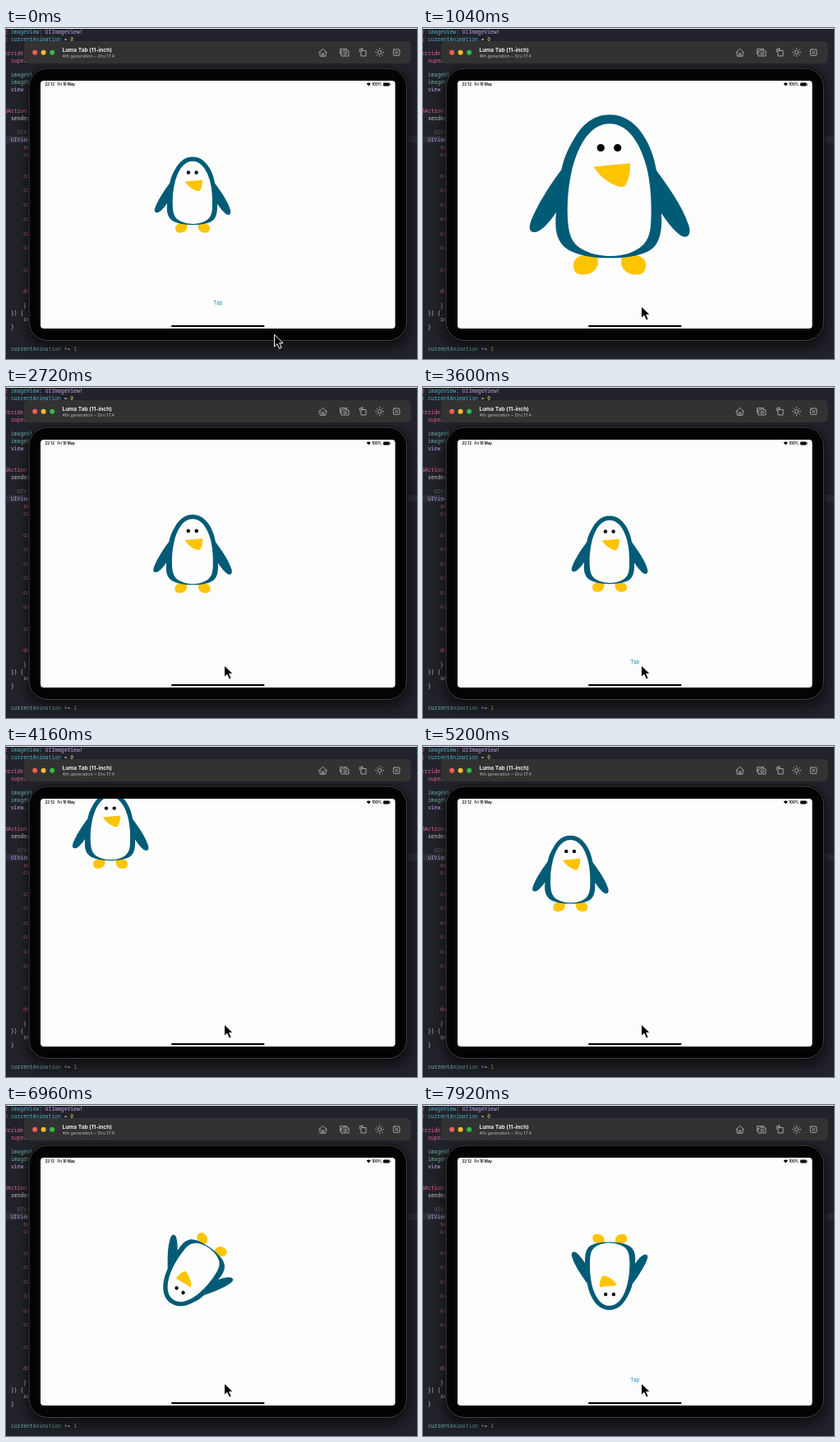
Recreate the animation shown at these times as an HTML page. Size 500 by 402 pixels, loop 8000 ms.

```html
<!DOCTYPE html>
<html lang="en">
<head>
<meta charset="utf-8">
<title>Spring animations</title>
<style>
html, body { margin: 0; width: 100%; height: 100%; overflow: hidden; background: #22232a; }
svg { display: block; width: 500px; height: 402px; }
text { white-space: pre; }
.code { font: 500 6.35px "Noto Sans Mono", "DejaVu Sans Mono", monospace; fill: #cfd0d4; }
.k { fill: #e0609a; }
.d { fill: #4fb0c8; }
.v { fill: #67b0a1; }
.t { fill: #c6a4f0; }
.n { fill: #d0bf69; }
.c { fill: #666b75; }
.ui { font-family: Inter, Roboto, sans-serif; }
.icon { fill: none; stroke: #bdbdbd; stroke-width: .8; stroke-linejoin: round; stroke-linecap: round; }
</style>
</head>
<body>
<svg viewBox="0 0 500 402">
  <defs>
    <clipPath id="screen"><rect x="42" y="64" width="431.5" height="301" rx="4"/></clipPath>
    <filter id="soft" x="-10%" y="-10%" width="120%" height="120%"><feGaussianBlur stdDeviation="7"/></filter>
  </defs>
  <rect width="500" height="402" fill="#22232a"/>
  <rect y="131" width="500" height="8.6" fill="#2d2e36"/>
  <g id="code" class="code"></g>
  <rect width="500" height="1" fill="#f0f0f0"/>

  <rect x="24" y="52" width="468" height="338" rx="26" fill="#000" opacity=".5" filter="url(#soft)"/>

  <!-- title bar -->
  <rect x="22" y="16" width="470.5" height="27" rx="5" fill="#323233"/>
  <circle cx="35.1" cy="29.8" r="3" fill="#fb5b54"/>
  <circle cx="45.6" cy="29.8" r="3" fill="#f8ba32"/>
  <circle cx="56.2" cy="29.8" r="3" fill="#31bd44"/>
  <g class="ui">
    <text x="68.5" y="28.8" font-size="6.6" font-weight="700" fill="#ececec">Luma Tab (11-inch)</text>
    <text x="68.5" y="36.2" font-size="5.4" fill="#b4b4b4">4th generation – Oru 17.4</text>
  </g>
  <g class="icon">
    <path d="M380.5 30L385.5 25.3L390.5 30M382 29V34.2H389V29M384.5 34V30.8H386.5V34"/>
    <path d="M406.5 31.5V25.6H414.6V26.8M408.3 28H410.2L411 27H413.4L414.2 28H417V34H408.3Z"/>
    <circle cx="412.5" cy="30.9" r="1.6"/>
    <path d="M432.3 27.5H438V34H432.3ZM430.3 29V25.7H434M432.8 24.4L434.2 25.7L432.8 27"/>
    <circle cx="454.5" cy="29.7" r="2.2"/>
    <path d="M454.5 24.6V25.7M454.5 33.7V34.8M449.4 29.7H450.5M458.5 29.7H459.6M450.9 26.1L451.7 26.9M457.3 32.5L458.1 33.3M450.9 33.3L451.7 32.5M457.3 26.9L458.1 26.1"/>
    <rect x="471.3" y="26" width="7.6" height="7.4" rx="1"/>
    <path d="M473.4 28L476.8 31.4M476.8 28L473.4 31.4"/>
  </g>

  <!-- tablet -->
  <rect x="26.5" y="47.5" width="462.5" height="333.5" rx="24" fill="#0b0b0c"/>
  <rect x="28" y="49" width="459.5" height="330.5" rx="22.5" fill="#030303" stroke="#454648"/>
  <g clip-path="url(#screen)">
    <rect x="42" y="64" width="432" height="302" fill="#fdfdfd"/>
    <g id="bird">
      <g transform="scale(.475) translate(-227 -202.75)">
        <g fill="#ffc400">
          <path id="foot" d="M191 277C181 280 180 295 189 298.7C200 302 213 296 213 284L212 274Z"/>
          <use href="#foot" transform="matrix(-1 0 0 1 454 0)"/>
        </g>
        <path fill="#005b77" d="M227 105.3C207 105.3 193 118 183 136C175 149 171 160 168.5 172
          C158 186 143 208 134 228C128 241 128 248 136 248C143 248 153 237 162 224
          C160 244 162 256 172 266C184 276 205 279.3 227 279.3C250 279.3 271 276 281 266
          C289 257 291 244 290 225C296 234 305 246 313.5 252C322.5 257 327 250 323 239
          C315 215 297 191 284 173C281.5 160 278.5 149 271.5 136C261.5 118 247 105.3 227 105.3Z"/>
        <path fill="#fdfdfd" d="M227 116.3C204 116.3 189.5 141 182 169C177 189 175 210 176 231
          C177 247 179 257 188 265C197 272 211 277 228 277C245 277 258 272 266 265
          C275 257 277 247 277.5 231C278 210 277 189 272 169C264.5 141 250 116.3 227 116.3Z"/>
        <circle cx="216.3" cy="145.5" r="4.6"/>
        <circle cx="236.7" cy="145.5" r="4.6"/>
        <path fill="#ffc400" d="M207.5 168.5L252 164.3C252.5 174 250.5 184 246.5 190.5C244.5 193.5 240 193.5 235 191.5C224 187 215 180 207.5 168.5Z"/>
      </g>
    </g>
    <g class="ui" font-weight="600" font-size="4.4">
      <text x="47.5" y="70.2">22:12</text>
      <text x="62.5" y="70.2">Fri 10 May</text>
      <text x="445.2" y="70.2">100%</text>
    </g>
    <path d="M438.6 67.6Q441.2 65.5 443.8 67.6L441.2 70.5Z"/>
    <rect x="459" y="66.6" width="7.6" height="3.8" rx="1"/>
    <rect x="467" y="67.8" width=".7" height="1.4"/>
    <text id="tap" class="ui" x="257.8" y="336.3" font-size="6.3" text-anchor="middle" fill="#2089b8">Tap</text>
    <rect x="201" y="361" width="113.5" height="2" rx="1"/>
  </g>

  <path id="cursor" d="M0 0V14.6L3.5 11.3L6 17L8.7 15.8L6.2 10.3H10.6Z" fill="#000" stroke="#fff" stroke-width="1"/>
</svg>
<script>
const $ = id => document.getElementById(id);

// baseline, x, then class:text runs separated by "|"
const lines = [
  [7, -9.3, "k:var |d:imageView|:: |t:UIImageView!"],
  [15.6, -9.3, "k:var |d:currentAnimation| := |n:0"],
  [33, -9.3, "k:override"],
  [41.8, 6, "k:super"],
  [59.2, 6, "v:imageView"],
  [68, 6, "v:imageView"],
  [76.8, 6, "t:view."],
  [103, -9.3, "k:@IBAction"],
  [111.8, 6, ":sender"],
  [129.2, 13.5, "c:UIView"],
  [138, 6, "t:UIView"],
  [146.8, 21, "k:switch"],
  ...[155.5, 181.7, 199.2, 216.7, 234.2, 251.7, 269.2, 295.5].map(y => [y, 21, "k:case"]),
  [321.8, 21, "k:default"],
  [338.8, 21, ":}"],
  [347.5, 6, ":}) {"],
  [356.3, 21, ":sender"],
  [365, 6, ":}"],
  [391.5, 6, "v:currentAnimation| :+= |n:1"]
];
$("code").innerHTML = lines.map(([y, x, runs]) => {
  const spans = runs.split("|").map(run => {
    const cut = run.indexOf(":");
    const lead = run.startsWith(" ") ? " " : "";
    return `<tspan class="${run.slice(0, cut).trim()}">${lead}${run.slice(cut + 1)}</tspan>`;
  });
  return `<text x="${x}" y="${y}">${spans.join("")}</text>`;
}).join("");

const LOOP = 8000, STEP = 80;
const taps = { grow: 565, shrink: 1995, move: 3660, back: 5115, turn: 6600 };

// underdamped spring from 0 to 1, with a starting push
function spring(ms) {
  if (ms <= 0) return 0;
  const s = ms / 1000, w = 7.62 * s;
  return 1 - Math.exp(-4.4 * s) * (Math.cos(w) - .079 * Math.sin(w));
}

function draw(t) {
  const at = name => spring(t - taps[name]);
  const scale = t < taps.shrink ? 1 + at("grow") : 2 - at("shrink");
  const shift = -92.4 * (t < taps.back ? at("move") : 1 - at("back"));
  const angle = 180 * at("turn");
  $("bird").setAttribute("transform",
    `translate(${227 + shift} ${202.75 + shift}) rotate(${angle}) scale(${scale})`);

  const busy = Object.values(taps).some(tap => t >= tap && t < tap + 1000);
  $("tap").setAttribute("visibility", busy ? "hidden" : "visible");

  const p = Math.min(t / 440, 1), e = p * p * (3 - 2 * p);
  $("cursor").setAttribute("transform", `translate(${326.5 - 61 * e} ${372.3 - 34.3 * e})`);
}

function tick() {
  const t = performance.now() % LOOP;
  draw(Math.floor(t / STEP) * STEP);
  requestAnimationFrame(tick);
}
tick();
</script>
</body>
</html>
```
